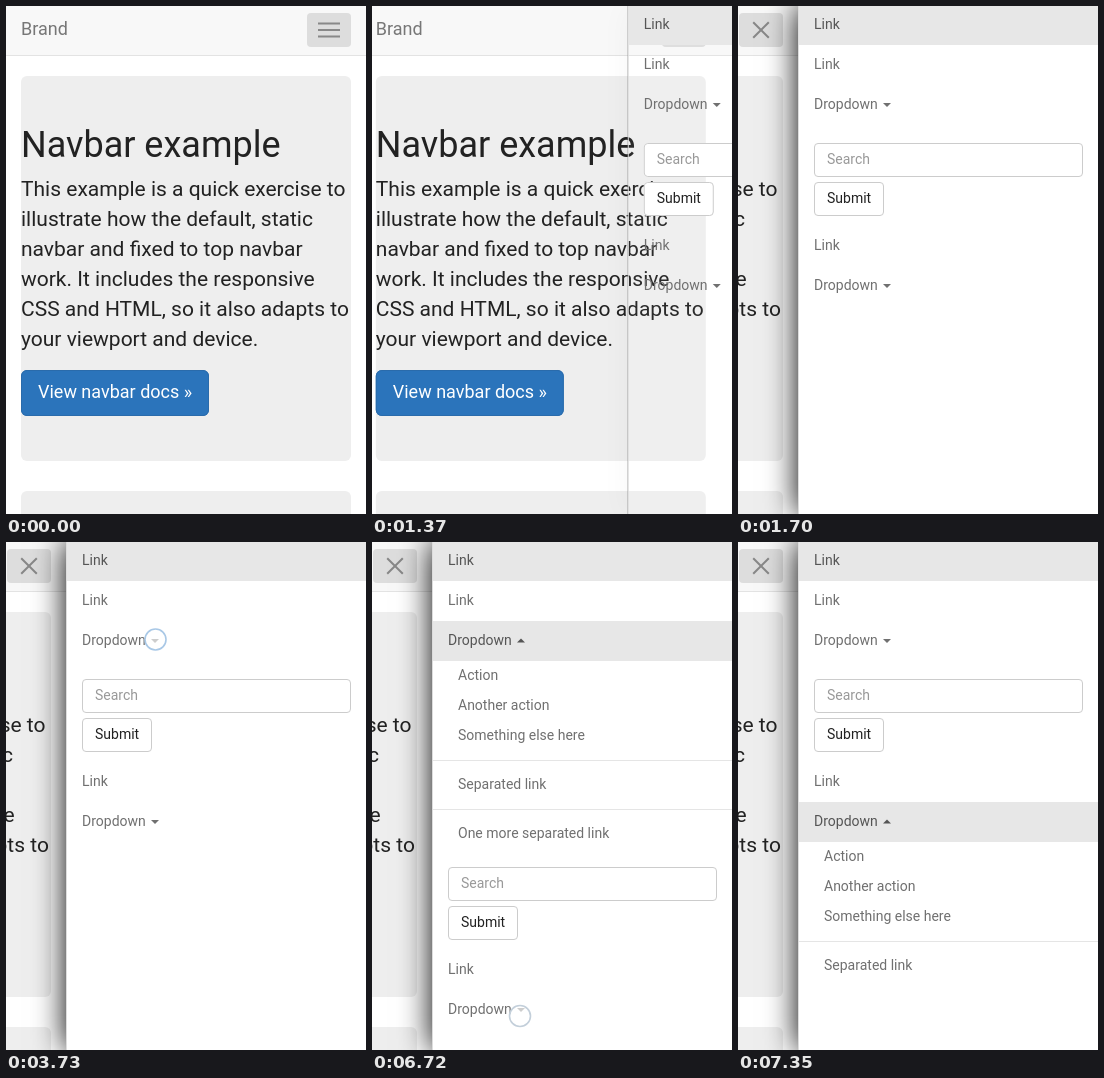
An HTML page with a canvas for the animation above (8 s loop, 360x508 px).

```html
<!DOCTYPE html>
<html lang="en">
<head>
<meta charset="utf-8">
<title>Off-canvas navbar</title>
<style>
  html, body { margin: 0; width: 100%; height: 100%; overflow: hidden; background: #fff; }
  canvas { display: block; width: 360px; height: 508px; }
</style>
</head>
<body>
<canvas id="stage"></canvas>
<script>
const WIDTH = 360, HEIGHT = 508, LOOP = 8000;
const MENU_HEIGHT = 188, LOWER_MENU_HEIGHT = 140;
const canvas = document.getElementById('stage');
const ctx = canvas.getContext('2d');
const ratio = window.devicePixelRatio || 1;
canvas.width = WIDTH * ratio;
canvas.height = HEIGHT * ratio;

const clamp = v => Math.min(1, Math.max(0, v));
const mix = (a, b, p) => a + (b - a) * p;

// The CSS "ease" curve, cubic-bezier(.25, .1, .25, 1), over a time span.
function ease(now, start, duration) {
  const x = clamp((now - start) / duration);
  if (x === 0 || x === 1) return x;
  const curve = (u, a, b) => 3 * u * (1 - u) ** 2 * a + 3 * u * u * (1 - u) * b + u ** 3;
  let low = 0, high = 1;
  for (let i = 0; i < 20; i++) {
    const mid = (low + high) / 2;
    if (curve(mid, .25, .25) < x) low = mid; else high = mid;
  }
  return curve(low, .1, 1);
}

function text(str, x, baseline, color, size = 14) {
  ctx.font = `${size}px Roboto, sans-serif`;
  ctx.fillStyle = color;
  ctx.fillText(str, x, baseline);
}

function rect(x, y, w, h, color) {
  ctx.fillStyle = color;
  ctx.fillRect(x, y, w, h);
}

function box(x, y, w, h, radius, fill, stroke) {
  ctx.beginPath();
  ctx.roundRect(x, y, w, h, radius);
  ctx.fillStyle = fill;
  ctx.fill();
  if (stroke) {
    ctx.beginPath();
    ctx.roundRect(x + .5, y + .5, w - 1, h - 1, radius - .5);
    ctx.strokeStyle = stroke;
    ctx.lineWidth = 1;
    ctx.stroke();
  }
}

// Hamburger bars that turn into a cross.
function menuIcon(cx, cy, cross) {
  for (const side of [-1, 0, 1]) {
    ctx.save();
    ctx.translate(cx, cy + side * 6.5 * (1 - cross));
    ctx.rotate(side * cross * Math.PI / 4);
    ctx.globalAlpha = side ? 1 : 1 - cross;
    rect(-11, -1, 22, 2, '#888');
    ctx.restore();
  }
}

function drawPage(shift, cross) {
  ctx.save();
  ctx.translate(-shift, 0);
  rect(0, 0, WIDTH + shift, 50, '#f8f8f8');
  rect(0, 49, WIDTH + shift, 1, '#e3e3e3');
  text('Brand', 15, 29, '#777', 18);
  box(301, 7, 44, 34, 4, '#ddd');
  menuIcon(323, 24, cross);

  box(15, 70, 330, 385, 6, '#eee');
  box(15, 485, 330, 385, 6, '#eee');
  text('Navbar example', 15, 151, '#222', 36);
  [
    'This example is a quick exercise to',
    'illustrate how the default, static',
    'navbar and fixed to top navbar',
    'work. It includes the responsive',
    'CSS and HTML, so it also adapts to',
    'your viewport and device.'
  ].forEach((line, i) => text(line, 15, 190 + i * 30, '#222', 21));
  box(15, 364, 188, 46, 6, '#2b74bb', '#2a6bab');
  text('View navbar docs »', 32, 392, '#fff', 18);
  ctx.restore();
}

function dropdown(top, open, menuHeight) {
  const color = open ? '#555' : '#707070';
  if (open) rect(1, top, 300, 40, '#e7e7e7');
  text('Dropdown', 16, top + 24, color);
  const tip = open ? top + 17.5 : top + 22, base = open ? top + 21.5 : top + 18;
  ctx.beginPath();
  ctx.moveTo(85, base);
  ctx.lineTo(93, base);
  ctx.lineTo(89, tip);
  ctx.fill();

  if (menuHeight <= 0) return;
  ctx.save();
  ctx.beginPath();
  ctx.rect(1, top + 40, 300, menuHeight);
  ctx.clip();
  ctx.translate(0, top + 40);
  text('Action', 26, 19, '#707070');
  text('Another action', 26, 49, '#707070');
  text('Something else here', 26, 79, '#707070');
  rect(1, 99, 300, 1, '#e5e5e5');
  text('Separated link', 26, 128, '#707070');
  rect(1, 148, 300, 1, '#e5e5e5');
  text('One more separated link', 26, 177, '#707070');
  ctx.restore();
}

function drawPanel(left, opacity, menus) {
  ctx.save();
  ctx.beginPath();
  ctx.rect(0, 0, left, HEIGHT);
  ctx.clip();
  ctx.shadowColor = `rgba(0, 0, 0, ${opacity})`;
  ctx.shadowBlur = 30 * ratio;
  rect(left, 0, 300, HEIGHT, '#000');
  ctx.restore();

  ctx.save();
  ctx.translate(left, 0);
  rect(0, 0, 300, HEIGHT, `rgba(255, 255, 255, ${opacity})`);
  rect(0, 0, 1, HEIGHT, '#ddd');
  rect(1, 0, 300, 39, '#e7e7e7');
  text('Link', 16, 23, '#555');
  text('Link', 16, 63, '#707070');
  dropdown(79, menus.upperOpen, menus.upper);

  ctx.translate(0, menus.upper);
  box(16, 137, 269, 34, 4, '#fff', '#ccc');
  text('Search', 29, 158, '#999');
  box(16, 176, 70, 34, 4, '#fff', '#ccc');
  text('Submit', 29, 197, '#222');
  text('Link', 16, 244, '#707070');
  dropdown(260, menus.lowerOpen, menus.lower);
  ctx.restore();
}

function touch(x, y, color, alpha = 1) {
  if (alpha <= 0) return;
  ctx.save();
  ctx.globalAlpha = alpha;
  ctx.beginPath();
  ctx.arc(x, y, 10.5, 0, Math.PI * 2);
  ctx.fillStyle = 'rgba(255, 255, 255, .65)';
  ctx.fill();
  ctx.strokeStyle = color;
  ctx.lineWidth = 1.6;
  ctx.stroke();
  ctx.restore();
}

function drawTouches(t) {
  if (t >= 500 && t < 1305) {
    const p = ease(t, 470, 800);
    touch(mix(368, 323, p), mix(-8, 28, p), '#b4cbe0');
  }
  const fade = start => t < start ? 0 : 1 - clamp((t - start - 60) / 150);
  touch(149.5, 97.5, '#a9c8e6', fade(3730));
  touch(148, 474, '#c3cfda', fade(6720));
}

function draw(t) {
  ctx.setTransform(ratio, 0, 0, ratio, 0, 0);
  rect(0, 0, WIDTH, HEIGHT, '#fff');

  const slide = ease(t, 1293, 350);
  const push = ease(t, 1352, 348);
  const swap = ease(t, 6840, 480);
  drawPage(300 * push, push);
  if (slide > 0) {
    drawPanel(mix(360, 60, slide), push, {
      upperOpen: t >= 3850 && t < 6840,
      upper: MENU_HEIGHT * (ease(t, 3850, 450) - swap),
      lowerOpen: t >= 6840,
      lower: LOWER_MENU_HEIGHT * swap
    });
  }
  drawTouches(t);
}

const begin = performance.now();
function tick() {
  draw((performance.now() - begin) % LOOP);
  requestAnimationFrame(tick);
}
tick();
</script>
</body>
</html>
```
